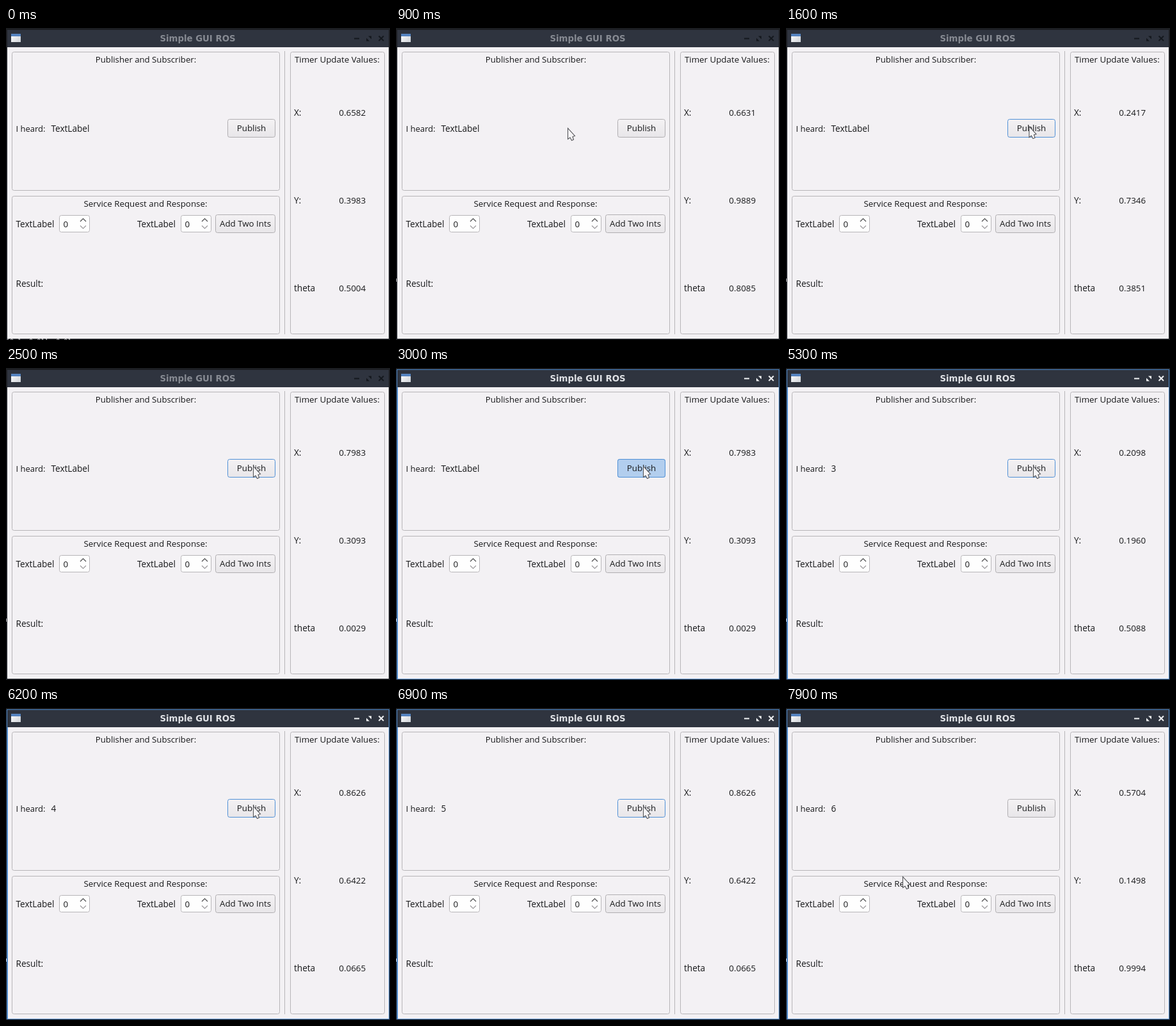
Animation of 600 by 487 pixels, one loop 8 s. Source, as an HTML page with a canvas:

```html
<!DOCTYPE html>
<html lang="en">
<head>
<meta charset="utf-8">
<title>Simple GUI ROS</title>
<style>
  html, body { margin: 0; width: 100%; height: 100%; overflow: hidden; background: #1c1e22; }
  canvas { display: block; }
</style>
</head>
<body>
<canvas id="stage" width="600" height="487"></canvas>
<script>
const ctx = document.getElementById('stage').getContext('2d');
const LOOP = 8000, STEP = 100, FADE = 100;
const BODY = '#f3f1f4', LINE = '#b7b5b8', BLUE = '#4f90d6', INK = '#17181a';

// Timer readings: start time, X, Y, theta
const readings = [
  [0, '0.6582', '0.3983', '0.5004'],
  [100, '0.6631', '0.9889', '0.8085'],
  [1100, '0.2417', '0.7346', '0.3851'],
  [2100, '0.7983', '0.3093', '0.0029'],
  [3100, '0.4925', '0.8270', '0.6738'],
  [4100, '0.9780', '0.5657', '0.5102'],
  [5100, '0.2098', '0.1960', '0.5088'],
  [6100, '0.8626', '0.6422', '0.0665'],
  [7100, '0.5704', '0.1498', '0.9994']
];

// Mouse presses on the button: down, up
const clicks = [[2900, 3100], [4000, 4300], [4900, 5100], [5800, 6000], [6600, 6750], [7200, 7400]];
const FOCUS_AT = 2900;

// Pointer stops: time, x, y
const pointer = [[200, 205, 490], [900, 268, 156], [1000, 268, 156], [1700, 386, 153], [7600, 386, 153], [7900, 182, 263]];

const clamp = v => Math.max(0, Math.min(1, v));
const smooth = v => v * v * (3 - 2 * v);

function pointerAt(t) {
  if (t < pointer[0][0]) return null;
  for (let i = 1; i < pointer.length; i++) {
    const [t0, x0, y0] = pointer[i - 1], [t1, x1, y1] = pointer[i];
    if (t <= t1) {
      const k = smooth((t - t0) / (t1 - t0));
      return [x0 + (x1 - x0) * k, y0 + (y1 - y0) * k];
    }
  }
  return pointer[pointer.length - 1].slice(1);
}

function pressAmount(t) {
  return Math.max(...clicks.map(([down, up]) =>
    Math.min(clamp((t - down) / FADE), clamp(1 - (t - up) / FADE))));
}

function text(str, x, midY, size = 13.35, align = 'left') {
  ctx.font = `${size}px "Open Sans", sans-serif`;
  ctx.textAlign = align;
  ctx.fillStyle = INK;
  ctx.fillText(str, x, midY + 4.8);
}

function rect(x, y, w, h, fill) {
  ctx.fillStyle = fill;
  ctx.fillRect(x, y, w, h);
}

function box(x, y, w, h, fill, stroke, radius = 3) {
  ctx.beginPath();
  ctx.roundRect(x + 0.5, y + 0.5, w, h, radius);
  ctx.fillStyle = fill;
  ctx.fill();
  ctx.strokeStyle = stroke;
  ctx.lineWidth = 1;
  ctx.stroke();
}

function poly(points, color, width = 1) {
  ctx.beginPath();
  points.forEach(([x, y]) => ctx.lineTo(x, y));
  ctx.strokeStyle = color;
  ctx.lineWidth = width;
  ctx.stroke();
}

function button(label, x, y, w, h, hover = false, press = 0) {
  const g = ctx.createLinearGradient(0, y, 0, y + h);
  g.addColorStop(0, '#f4f2f4');
  g.addColorStop(1, '#e8e6e9');
  box(x, y, w, h, g, hover ? BLUE : '#b0aeb1');
  if (press > 0) {
    ctx.globalAlpha = press;
    box(x, y, w, h, '#b2ceee', BLUE);
    ctx.globalAlpha = 1;
  }
  text(label, x + w / 2 + 0.5, y + h / 2, 13.3, 'center');
}

function spinBox(x) {
  box(x, 292, 47, 26, '#fefefe', LINE);
  text('0', x + 6.5, 306);
  const cx = x + 37.5;
  poly([[cx - 4.5, 302], [cx, 297.5], [cx + 4.5, 302]], '#4a4a4c', 1.2);
  poly([[cx - 4.5, 308.5], [cx, 313], [cx + 4.5, 308.5]], '#9b999c', 1.2);
}

function titleBar(focused) {
  rect(2, 3, 596, 27, '#2f343f');
  ctx.font = 'bold 13.3px "DejaVu Sans", sans-serif';
  ctx.textAlign = 'center';
  ctx.fillStyle = focused ? '#dfe1e5' : '#868a92';
  ctx.fillText('Simple GUI ROS', 299.5, 21);

  const icon = ctx.createLinearGradient(8, 9, 22, 22);
  icon.addColorStop(0, '#ffffff');
  icon.addColorStop(1, '#cfd3d8');
  rect(8, 9, 15, 13, icon);
  rect(8, 9, 15, 4, '#5583c0');

  const ink = focused ? '#f2f3f5' : '#15181e';
  rect(544, 15.5, 8, 2, ink);
  poly([[582.5, 12.5], [590, 20]], ink, 2);
  poly([[590, 12.5], [582.5, 20]], ink, 2);
  ctx.fillStyle = ink;
  for (const s of [1, -1]) {
    ctx.beginPath();
    ctx.moveTo(567 + 4 * s, 16.5 - 4 * s);
    ctx.lineTo(567 - 1 * s, 16.5 - 4 * s);
    ctx.lineTo(567 + 4 * s, 16.5 + 1 * s);
    ctx.fill();
  }
}

function windowFrame(t) {
  const focused = t >= FOCUS_AT;
  rect(0, 0, 600, 487, '#1c1e22');
  if (focused) rect(1, 2, 598, 484, '#4c87c8');
  titleBar(focused);
  rect(focused ? 3 : 2, 30, focused ? 595 : 596, 455, BODY);
  if (t < 100) {
    ctx.font = '10px "DejaVu Sans Mono", monospace';
    ctx.textAlign = 'left';
    ctx.fillStyle = '#b9babb';
    ctx.fillText('[0.1, 0.01], 0.01', 0, 493);
  } else {
    rect(0, 391, 1, 5, '#d5d6d8');
  }
}

function drawPointer(x, y) {
  ctx.beginPath();
  [[0, 0], [0, 17], [3.5, 14.5], [6, 19], [9, 17.8], [7.5, 13], [11, 12]]
    .forEach(([dx, dy]) => ctx.lineTo(x + 0.5 + dx, y + 0.5 + dy));
  ctx.closePath();
  ctx.fillStyle = '#f5f4f6';
  ctx.fill();
  ctx.strokeStyle = '#55565a';
  ctx.lineWidth = 1.1;
  ctx.stroke();
}

function draw(t) {
  const pos = pointerAt(t);
  const hover = !!pos && pos[0] >= 346 && pos[1] >= 143 && pos[1] <= 171;
  const count = clicks.filter(([, up]) => t >= up + FADE).length;
  const reading = readings.filter(r => t >= r[0]).pop();

  windowFrame(t);

  box(9, 37, 418, 216, BODY, LINE);
  text('Publisher and Subscriber:', 218.5, 49, 13.2, 'center');
  text('I heard:', 15.5, 157, 13);
  text(count || 'TextLabel', 70.5, 157, 13.6);
  button('Publish', 346, 142, 74, 28, hover, hover ? pressAmount(t) : 0);

  box(9, 262, 418, 215, BODY, LINE);
  text('Service Request and Response:', 218, 274, 13.35, 'center');
  text('TextLabel', 15.5, 306, 13.6);
  spinBox(83);
  text('TextLabel', 205, 306, 13.6);
  spinBox(273);
  button('Add Two Ints', 327, 291, 93, 28);
  text('Result:', 15.5, 399, 13.6);

  rect(435, 36, 1, 442, LINE);

  box(444, 37, 147, 440, BODY, LINE);
  text('Timer Update Values:', 517.3, 49, 13.35, 'center');
  ['X:', 'Y:', 'theta'].forEach((label, i) => {
    const y = 132.5 + i * 136.8;
    text(label, 450, y, 13.6);
    text(reading[i + 1], 520.3, y, 13.4);
  });

  if (pos) drawPointer(...pos);
}

function tick() {
  draw(Math.floor((performance.now() % LOOP) / STEP) * STEP);
  requestAnimationFrame(tick);
}
tick();
</script>
</body>
</html>
```
